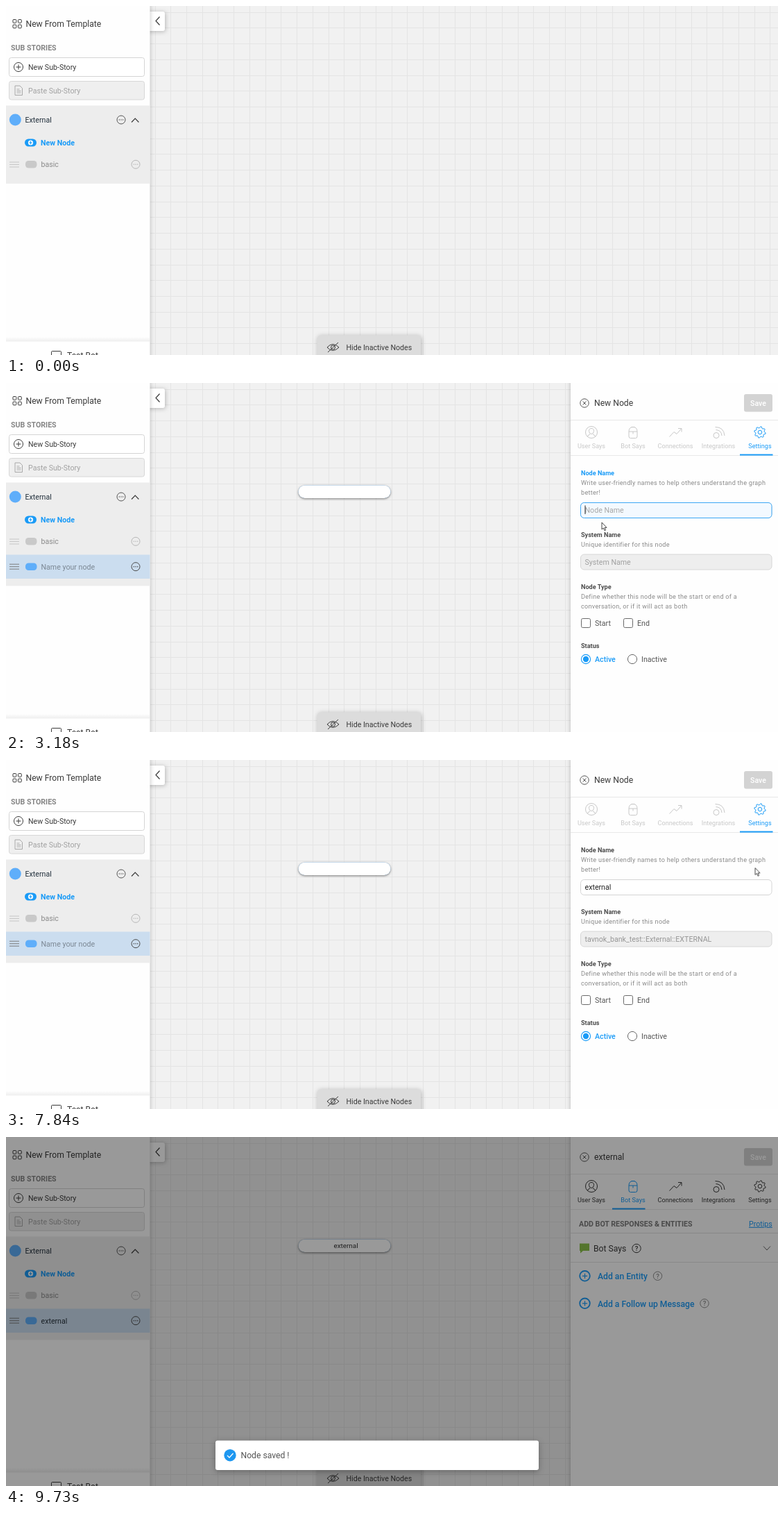
An HTML page that plays this animation: 1113x503 px, repeating every 9960 ms.

```html
<!DOCTYPE html>
<html lang="en">
<head>
<meta charset="utf-8">
<title>New node flow</title>
<style>
  html, body { margin: 0; width: 100%; height: 100%; overflow: hidden; background: #f1f1f1; }
  svg { display: block; width: 1113px; height: 503px; font-family: Roboto, sans-serif; }
  text { white-space: pre; }
  .side, .panel { filter: drop-shadow(0 0 3px rgba(0, 0, 0, .25)); }
  .flap { filter: drop-shadow(1px 1px 3px rgba(0, 0, 0, .25)); }
  .white { filter: drop-shadow(0 1.5px 1.5px rgba(0, 0, 0, .5)); }
  .toast { filter: drop-shadow(0 2px 4px rgba(0, 0, 0, .3)); }
  .spin { transform-box: fill-box; transform-origin: center; }
</style>
</head>
<body>
<svg id="stage" viewBox="0 0 1113 503"></svg>
<script>
const LOOP = 9960;
const BLUE = '#1a9bf7', SOFT = '#5faefa', DARK = '#3a3a3a', GREY = '#8a8a8a', PALE = '#c8c8c8';
const L = 10.64, XL = 12.16, S = 9.12;

// ---- Drawing helpers (y is the middle of the capitals)
const text = (x, y, str, size = L, fill = DARK, extra = '') =>
  `<text x="${x}" y="${y + size * .355}" font-size="${size}" fill="${fill}" ${extra}>${str}</text>`;
const bold = 'font-weight="700"', medium = 'font-weight="500"', middle = 'text-anchor="middle"';
const box = (x, y, w, h, r, fill, stroke = 'none', extra = '') =>
  `<rect x="${x}" y="${y}" width="${w}" height="${h}" rx="${r}" fill="${fill}" stroke="${stroke}" ${extra}/>`;
const line = (d, stroke = DARK, width = 1, extra = '') =>
  `<path d="${d}" fill="none" stroke="${stroke}" stroke-width="${width}" ${extra}/>`;
const ring = (x, y, r, stroke = DARK, width = 1, fill = 'none') =>
  `<circle cx="${x}" cy="${y}" r="${r}" fill="${fill}" stroke="${stroke}" stroke-width="${width}"/>`;
const group = (name, ...parts) => `<g class="${name}">${parts.join('')}</g>`;
const plus = (x, y, r, color, width = 1) => line(`M${x - r} ${y}h${2 * r}M${x} ${y - r}v${2 * r}`, color, width);
const more = (x, y, color) =>
  ring(x, y, 6, color) + [-2.6, 0, 2.6].map(d => ring(x + d, y, .75, 'none', 0, color)).join('');
const bars = (y, color) => line(`M5 ${y - 3.5}h14M5 ${y}h14M5 ${y + 3.5}h14`, color);
const help = (x, y, color) => ring(x, y, 6.2, color) + text(x, y, '?', 9.5, color, `${middle} ${medium}`);

// ---- Animation helpers (times in ms)
const anims = {};
let css = '';
function play(name, prop, stops, ease = 'linear') {
  const key = `${name}-${prop}`;
  const all = [[0, stops[0][1], 'step-end'], ...stops, [LOOP, stops[stops.length - 1][1]]];
  css += `@keyframes ${key}{` + all.map(([ms, value, own]) =>
    `${(ms / LOOP * 100).toFixed(4)}%{${prop}:${value};animation-timing-function:${own || ease}}`).join('') + '}';
  (anims[name] ||= []).push(`${key} ${LOOP}ms infinite`);
}
// Hard on/off switches: on, off, on, off ...
const show = (name, ...times) =>
  play(name, 'opacity', [[0, 0], ...times.map((ms, i) => [ms, 1 - i % 2])], 'step-end');
const move = (name, stops, ease) =>
  play(name, 'transform', stops.map(([ms, x, y = 0, own]) => [ms, `translate(${x}px,${y}px)`, own]), ease);

// ---- Canvas
function grid() {
  let d = '';
  for (let k = 0; k < 40; k++) {
    const at = o => Math.floor(o + k * 22.74) + .5;
    d += `M${at(215)} 0V503` + (k < 22 ? `M208 ${at(9.2)}H1113` : '');
  }
  return line(d, '#e4e4e4');
}
const canvas = box(0, 0, 1113, 503, 0, '#f1f1f1') + grid() +
  group('node',
    box(421.5, 147.5, 133, 18.5, 9.25, SOFT),
    group('white', box(421.5, 147.5, 133, 18.5, 9.25, '#fff')),
    group('saved', text(490, 156.5, 'external', 9.88, DARK, `class="nodetext" ${middle}`))) +
  group('flap', box(200, 8, 29, 28, 3, '#fff')) +
  line('M221.500 15.500L216 21.500L221.500 27.500', DARK, 1.2) +
  group('flap', box(448.500, 474.500, 149.500, 40, 5, '#dcdcdc')) +
  line('M463 492Q471 483 480 492Q471 501 463 492ZM464 499L479 485') + ring(471.5, 492, 3) +
  text(490.5, 492.5, 'Hide Inactive Nodes');

// ---- Sidebar
const side = group('side', box(-5, -5, 212.5, 515, 0, '#fefefe')) +
  [[10, 19.5], [17.5, 19.5], [10, 27], [17.5, 27]].map(([x, y]) => box(x, y, 4.8, 4.8, 1, 'none', DARK)).join('') +
  text(28.5, 25.5, 'New From Template', XL) +
  text(7, 60.5, 'SUB STORIES', L, '#858585', bold) +
  box(4.5, 74.5, 195, 27, 3, '#fff', '#d4d4d4') + ring(18, 88, 6.5) + plus(18, 88, 3.5, DARK) +
  text(32, 88.5, 'New Sub-Story') +
  box(4.5, 108.5, 195, 26.5, 3, '#efefef', '#d8d8d8') +
  line('M13 115h7l3.500 3.500v10h-10.500ZM15.500 120h4M15.500 122.500h6M15.500 125h6', '#a8a8a8') +
  text(32, 121.8, 'Paste Sub-Story', L, '#a2a2a2') +
  box(0, 143.5, 207.5, 112.5, 0, '#ededed') +
  ring(13.3, 164, 8.5, 'none', 0, SOFT) + text(27.5, 164, 'External', L, '#22303c') +
  more(166, 164, '#555') + line('M181 167.500L186.200 162L191.400 167.500', DARK, 1.2) +
  box(27, 191.5, 17, 11, 5.5, BLUE) + ring(35.5, 197, 3.6, 'none', 0, '#fff') + plus(35.5, 197, 2.2, BLUE, 1.2) +
  text(50, 197, 'New Node', L, BLUE, bold) +
  bars(228.5, '#c6c6c6') + box(28, 223, 16.5, 10.5, 4.5, '#c9c9c9') +
  text(50.5, 228.5, 'basic', L, GREY) + more(187, 228.3, '#b8b8b8') +
  group('row', box(0, 255.5, 207.5, 37, 0, '#ededed'),
    group('picked', box(0, 247.5, 207.5, 34.5, 0, '#cbddef')),
    bars(264.7, '#7c7c7c'), box(28, 259.5, 16.5, 10.5, 4.5, SOFT),
    group('unnamed', text(50.5, 265, 'Name your node', L, '#7c8894')),
    group('saved', text(50.5, 265, 'external', L, '#26323c')),
    more(187, 264.7, '#4a4a4a')) +
  `<defs><linearGradient id="lift" x2="0" y2="1"><stop stop-color="#000" stop-opacity="0"/>
   <stop offset="1" stop-color="#000" stop-opacity=".07"/></linearGradient></defs>` +
  box(0, 477, 207, 7, 0, 'url(#lift)') + box(0, 483.5, 207, 20, 0, '#fff') +
  box(65.5, 497.5, 14, 12, 1, 'none', DARK) + text(88, 504, 'Test Bot', XL);

// ---- Node panel, drawn from its own left edge
function gear(x, y) {
  let d = '';
  for (let i = 0; i < 32; i++) {
    const r = i % 4 < 2 ? 8.2 : 6.3, a = (i + .5) * Math.PI / 16;
    d += `${i ? 'L' : 'M'}${(x + r * Math.cos(a)).toFixed(2)} ${(y + r * Math.sin(a)).toFixed(2)}`;
  }
  return line(d + 'Z', 'currentColor', 1, 'stroke-linejoin="round"') + ring(x, y, 2.8, 'currentColor');
}
const ink = (d) => line(d, 'currentColor');
const tab = (name, x, label, icon) =>
  group(name, group(name + 'icon', icon), group(name + 'label', text(x, 91, label, S, 'currentColor', middle)));
const tabs =
  tab('idle', 30, 'User Says', ring(30, 71, 8.5, 'currentColor') +
    ink('M30 65.500q3.800 0 3.500 4t-3.500 4t-3.500-4t3.500-4M24.500 77q1-2.500 3.500-3M35.500 77q-1-2.500-3.500-3')) +
  tab('bot', 90, 'Bot Says', ink('M84 70q0-6.500 6-6.500t6 6.500v7q0 2.500-2.500 2.500h-7q-2.500 0-2.500-2.500ZM84 70h12M90 70v3.500M87.500 63.500h5')) +
  tab('idle', 151, 'Connections', ink('M142.500 77.500l6.500-7l4 3l6.500-7.500M155 65.500h5v5')) +
  tab('idle', 213, 'Integrations', ring(210, 75.5, 4, 'currentColor') +
    ink('M209.500 67.500q8 .5 8.500 8.500M208.500 63.500q12.500 0 13.500 12.500')) +
  tab('set', 273, 'Settings', gear(273, 71));

const note = (y, str) => text(15, y, str, S, GREY, 'letter-spacing=".27"');
const label = (y, str, extra = '') => text(15, y, str, S, '#4c4c4c', `${bold} ${extra}`);
const tick = (x, str) => box(x, 339.5, 13, 13, 2, '#fff', '#6a6a6a') + text(x + 19.5, 346, str, L, '#555');

const WORD = 'external', TYPED = [3410, 3550, 3860, 4030, 4180, 4340, 4420, 5430];
const typing = TYPED.map((_, i) => {
  const part = WORD.slice(0, i + 1);
  return group('type' + i, text(20.5, 183, part, L, '#222', 'data-typed'),
    text(20.5, 257.8, 'tavnok_bank_test::External::' + part.toUpperCase(), L, '#969696'));
}).join('');

const settings = group('settings',
  label(129.5, 'Node Name', 'class="focuslabel"'),
  note(143.5, 'Write user-friendly names to help others understand the graph'), note(158, 'better!'),
  box(14.5, 172.5, 275.5, 22, 5, '#fff', '#d4d4d4'),
  group('focus', box(14.5, 172.5, 275.5, 22, 5, '#f3f9ff', '#3ba7f5')),
  label(218.5, 'System Name'), note(232.5, 'Unique identifier for this node'),
  box(14.5, 247, 275.5, 22, 5, '#eee', '#d6d6d6'),
  group('hint', text(20.5, 183, 'Node Name', L, '#a6a6a6'), text(20.5, 257.8, 'System Name', L, '#a0a0a0'),
    box(20.5, 176.5, 1, 12.5, 0, '#222', 'none', 'class="caret"')),
  typing,
  label(293.5, 'Node Type'), note(307.5, 'Define whether this node will be the start or end of a'),
  note(322, 'conversation, or if it will act as both'),
  tick(15.5, 'Start'), tick(76.5, 'End'),
  label(378.8, 'Status'),
  ring(22, 398, 6.6, BLUE, 1.1, '#fff'), ring(22, 398, 4.2, 'none', 0, BLUE), text(35, 398.2, 'Active', L, BLUE, medium),
  ring(89, 398, 6.6, '#666', 1, '#fff'), text(102, 398.2, 'Inactive', L, '#555'));

const addLink = (y, str, helpX) => ring(20.5, y, 7.3, BLUE, 1.8) + plus(20.5, y, 3.6, BLUE, 1.2) +
  text(39, y + .5, str, XL, BLUE, medium) + help(helpX, y, '#8c8c8c');
const replies = group('replies',
  text(12, 125, 'ADD BOT RESPONSES &amp; ENTITIES', L, '#7a7a7a', bold),
  text(257, 125, 'Protips', L, BLUE, 'text-decoration="underline"'),
  line('M0 138.500H299M0 180.500H299', '#e2e2e2'),
  `<path d="M13 153.500h14v10.500h-9l-4 3.500v-3.500h-1Z" fill="#8bc34a"/>`,
  text(33, 160.7, 'Bot Says', XL), help(95, 160.5, DARK), line('M278 157.500L283 163L288 157.500', '#666'),
  addLink(200.3, 'Add an Entity', 125.5), addLink(239.8, 'Add a Follow up Message', 193));

const save = (fill) => box(250, 16, 41, 25.5, 3, fill) + text(270.5, 29, 'Save', L, '#fff', `${middle} ${medium}`);
const spinner = (x, y, color) => group('spinner',
  `<circle class="spin" cx="${x}" cy="${y}" r="16" fill="none" stroke="${color}" stroke-width="2"/>`);
const panel = `<g transform="translate(814)">` + group('slide',
  group('panel', box(0, -5, 330, 515, 0, '#fefefe')),
  ring(20, 29, 6.2, '#555'), line('M17.500 26.500l5 5m0-5l-5 5', '#555'),
  group('draft', text(34, 29, 'New Node', XL)), group('titled', text(34, 29, 'external', XL)),
  save('#d3d3d3'), group('ready', save('#1e9bff')),
  line('M0 53.500H299M0 104.500H299', '#e8e8e8'), tabs,
  box(244, 102.5, 47.5, 2, 0, BLUE, 'none', 'class="inkbar"'),
  settings, replies, spinner(149.5, 136, '#999')) + '</g>';

// ---- Overlay, toast and pointer
const top_ = box(0, 0, 1113, 503, 0, '#000', 'none', 'class="dim"') +
  group('toast', box(302, 437.5, 466, 42.5, 3, '#fff'), ring(323, 458.7, 8.7, 'none', 0, '#1e97f0'),
    line('M319 459l3 3l5.500-6', '#fff', 1.3), text(338.5, 459, 'Node saved !', XL, '#555')) +
  group('pointer',
    group('arrow', `<path d="M0 0V10L2.300 8L4 11.700L5.600 11L4 7.400H7Z" fill="#fff" stroke="#333" stroke-width=".9"/>`),
    group('hand', `<path d="M-1.500 8V1.200Q-1.500 0-.300 0T1 1.200V5Q6.500 5.500 7 7.500V10Q6.500 12 5.500 14H-.500Q-2-11 11-4 8.800Z" fill="none"/>
      <path d="M-1.500 8V1.200Q-1.500 0-.3 0T1 1.200V5Q6.500 5.500 7 7.500V10Q6.500 12 5.500 14H-.5Q-2 11-4 8.800Q-3.500 7-1.500 8.500Z" fill="#fff" stroke="#333" stroke-width=".9"/>`.replace(/^<path[^>]*\/>\s*/, '')));

const stage = document.getElementById('stage');
stage.innerHTML = canvas + side + panel + spinner(533, 256, BLUE) + top_;

// Caret sits at the end of each typed piece
stage.querySelectorAll('[data-typed]').forEach(el => {
  const x = 20.5 + el.getComputedTextLength();
  el.insertAdjacentHTML('afterend', box(x, 176.5, 1, 12.5, 0, '#222', 'none', 'class="caret"'));
});

// ---- Timeline
const SAVED = 7950, LOADED = 9150;
const SNAP = 'cubic-bezier(.25,.8,.25,1)';

show('node', 1750);
show('row', 1600);
show('picked', 1600, SAVED, LOADED);
show('unnamed', 1600, SAVED);
show('saved', SAVED);
play('white', 'opacity', [[1750, 0], [2080, 1], [SAVED, 1], [8200, 0], [9050, 0], [9300, 1]]);
play('nodetext', 'fill', [[9050, '#fff'], [9300, '#333']]);

move('slide', [[1760, 320], [2160, 0]], SNAP);
show('ready', 3410, 7400);
show('titled', LOADED);
play('draft', 'opacity', [[0, 1], [LOADED, 0]], 'step-end');
show('focus', 2200, 7400);
play('focuslabel', 'fill', [[0, '#4c4c4c'], [2200, BLUE], [7400, '#4c4c4c']], 'step-end');
play('hint', 'opacity', [[0, 1], [TYPED[0], 0]], 'step-end');
TYPED.forEach((ms, i) => show('type' + i, ms, ...TYPED.slice(i + 1, i + 2)));
show('caret', 2200, 2720, 3180, 4970, 5430, 5980, 6530, 7080);
play('settings', 'opacity', [[0, 1], [8250, 0]], 'step-end');
play('replies', 'opacity', [[9360, 0], [9660, 1]]);

play('idle', 'color', [[9050, PALE], [9300, DARK]]);
play('bot', 'color', [[8650, PALE], [8800, '#c4dff2'], [8980, '#a9cbe4'], [9250, BLUE]]);
play('setlabel', 'color', [[8600, BLUE], [8790, DARK]]);
play('seticon', 'color', [[8750, BLUE], [8950, DARK]]);
move('inkbar', [[2050, -5], [2160, 0], [8700, 0], [8800, -64], [8980, -154], [9150, -184]]);

play('dim', 'opacity', [[8750, 0], [8800, .065], [8980, .335], [9180, .4]]);
play('toast', 'opacity', [[8720, 0], [8800, .2], [8980, .78], [9200, 1]]);
move('toast', [[8720, 0, 22], [8800, 0, 17.5], [8980, 0, 8.5], [9250, 0, 0]]);
show('spinner', 8930, 9340);
play('spin', 'transform', [[8930, 'rotate(-80deg)'], [8980, 'rotate(-56deg)'], [9340, 'rotate(150deg)']]);
play('spin', 'stroke-dasharray', [[8980, '6 200'], [9340, '45 200']]);

move('pointer', [[290, 642, 311], [370, 566, 285], [540, 400, 266], [700, 162, 241], [850, 162, 241], [1170, 77, 194],
  [1420, 78, 187], [1570, 78, 187], [2050, 247, 144], [2490, 686, 145], [2720, 686, 145], [2860, 859, 201],
  [6210, 859, 201], [6360, 1093, 96], [6530, 1093, 94], [6750, 1104, 68], [7130, 1085, 32], [7600, 1085, 32],
  [8330, 1070, 406], [8800, 1064, 479], [8980, 1082, 499], [9060, 1090, 512]]);
show('pointer', 290, 9060);
play('arrow', 'opacity', [[0, 1], [1420, 0], [1640, 1], [6360, 0], [7640, 1]], 'step-end');
show('hand', 1420, 1640, 6360, 7640);

for (const name in anims) css += `.${name}{animation:${anims[name].join(',')}}`;
document.head.insertAdjacentHTML('beforeend', `<style>${css}</style>`);
</script>
</body>
</html>
```
